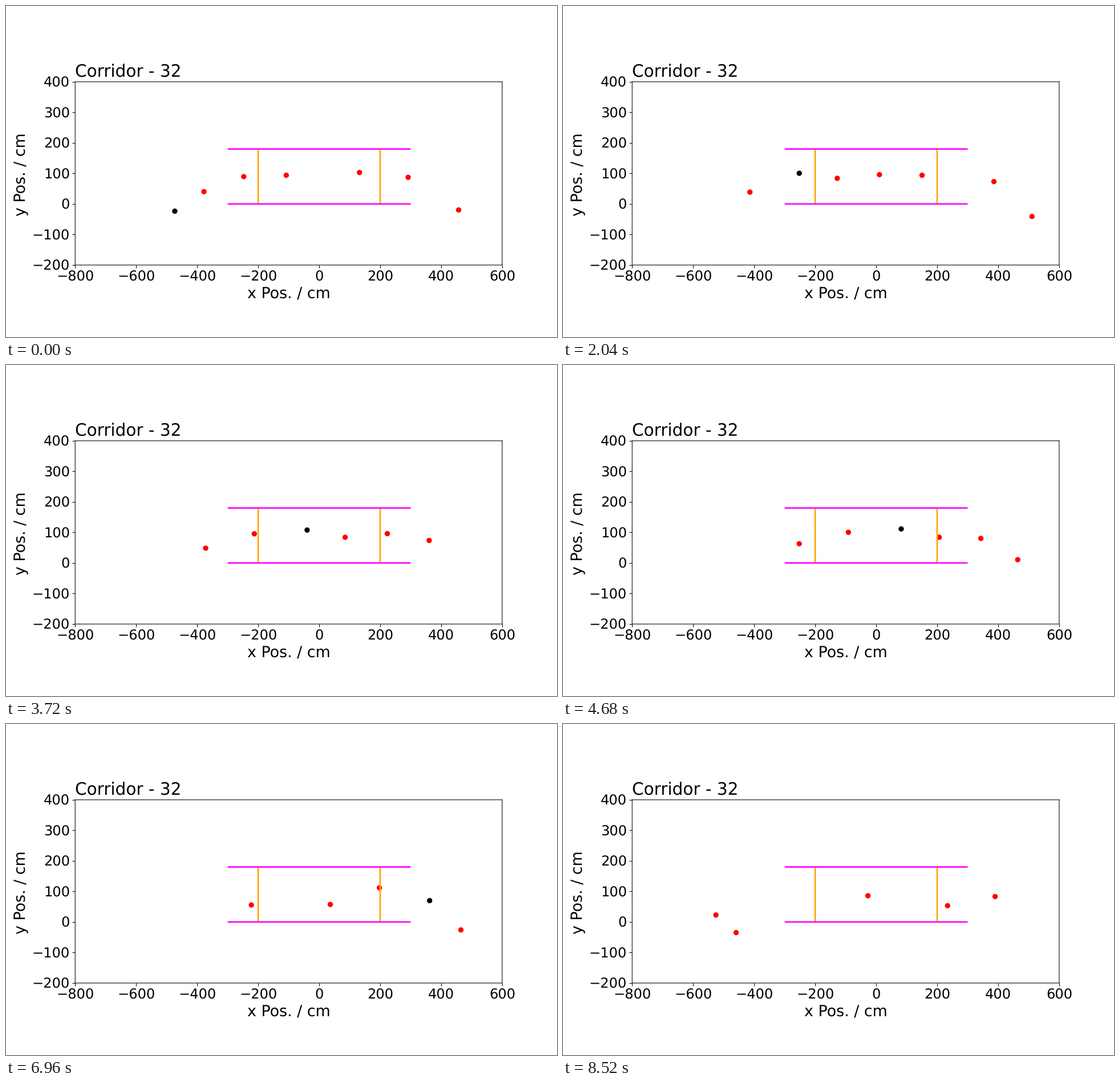
Recreate the animation shown at these times as a matplotlib script. Size 966 px wide and 580 px high, loop 8640 ms.

```python
import numpy as np
import matplotlib.pyplot as plt
from matplotlib.animation import FuncAnimation

WIDTH, HEIGHT, DPI = 966, 580, 96
FRAMES, INTERVAL = 72, 120
PACE = 15.2          # cm per frame
BEND = 0.002         # curvature of the paths outside the corridor
VIEW_LEFT, VIEW_BOTTOM = -570, -45
FONT_SCALE = WIDTH / (10 * DPI)

plt.rcParams.update({"font.family": "DejaVu Sans", "text.hinting": "none",
                     "path.snap": False})


class Walker:
    """Walks at a steady pace along a lane that bends down at both ends.

    mid is the frame at which x = 0 is crossed; lane is the height there.
    """

    def __init__(self, mid, lane, slope=0, enter=-230, leave=255, last=FRAMES, color="red"):
        self.last, self.color = last, color
        self.x = np.linspace(-640, 640, 1281)
        outside = np.maximum(enter - self.x, 0) + np.maximum(self.x - leave, 0)
        self.y = lane + slope * self.x - BEND * outside**2
        steps = np.hypot(np.diff(self.x), np.diff(self.y))
        length = np.concatenate([[0], np.cumsum(steps)])
        self.frames = mid + (length - np.interp(0, self.x, length)) / PACE

    def position(self, frame):
        return np.interp(frame, self.frames, self.x), np.interp(frame, self.frames, self.y)

    def visible(self, frame):
        x, y = self.position(frame)
        return x > VIEW_LEFT and y > VIEW_BOTTOM and frame <= self.last


walkers = [
    Walker(-32.1, 90, leave=223),
    Walker(-19.2, 90),
    Walker(-8.7, 103, leave=264),
    Walker(7.1, 94, leave=260),
    Walker(16.3, 96, enter=-190),
    Walker(25.4, 84, leave=230),
    Walker(33.6, 109, slope=0.03, leave=204, last=63, color="black"),
    Walker(45, 104, slope=0.04, enter=-258),
    Walker(55.6, 58, slope=-0.02, enter=-280),
    Walker(72.8, 90, slope=0.155, enter=-300),
    Walker(103.1, 70),
    Walker(106, 60, enter=-389),
]

fig = plt.figure(figsize=(WIDTH / DPI, HEIGHT / DPI), dpi=DPI)
ax = fig.add_axes([0.1255, 0.2174, 0.775, 0.5536])
ax.set(xlim=(-800, 600), ylim=(-200, 400),
       xticks=range(-800, 601, 200), yticks=range(-200, 401, 100))
ax.tick_params(labelsize=18 * FONT_SCALE)
ax.set_xlabel("x Pos. / cm", fontsize=20 * FONT_SCALE)
ax.set_ylabel("y Pos. / cm", fontsize=20 * FONT_SCALE, y=0.496)
ax.set_title("Corridor - 32", loc="left", fontsize=22 * FONT_SCALE)

ax.vlines([-200, 200], 0, 180, color="orange", linewidth=2)
ax.hlines([0, 180], -300, 300, color="magenta", linewidth=2)
dots = ax.scatter([], [], s=36, zorder=1)


def update(frame):
    present = [w for w in walkers if w.visible(frame)]
    dots.set_offsets([w.position(frame) for w in present])
    dots.set_color([w.color for w in present])
    return [dots]


anim = FuncAnimation(fig, update, frames=FRAMES, interval=INTERVAL,
                     repeat=True, repeat_delay=0)
plt.show()
```
